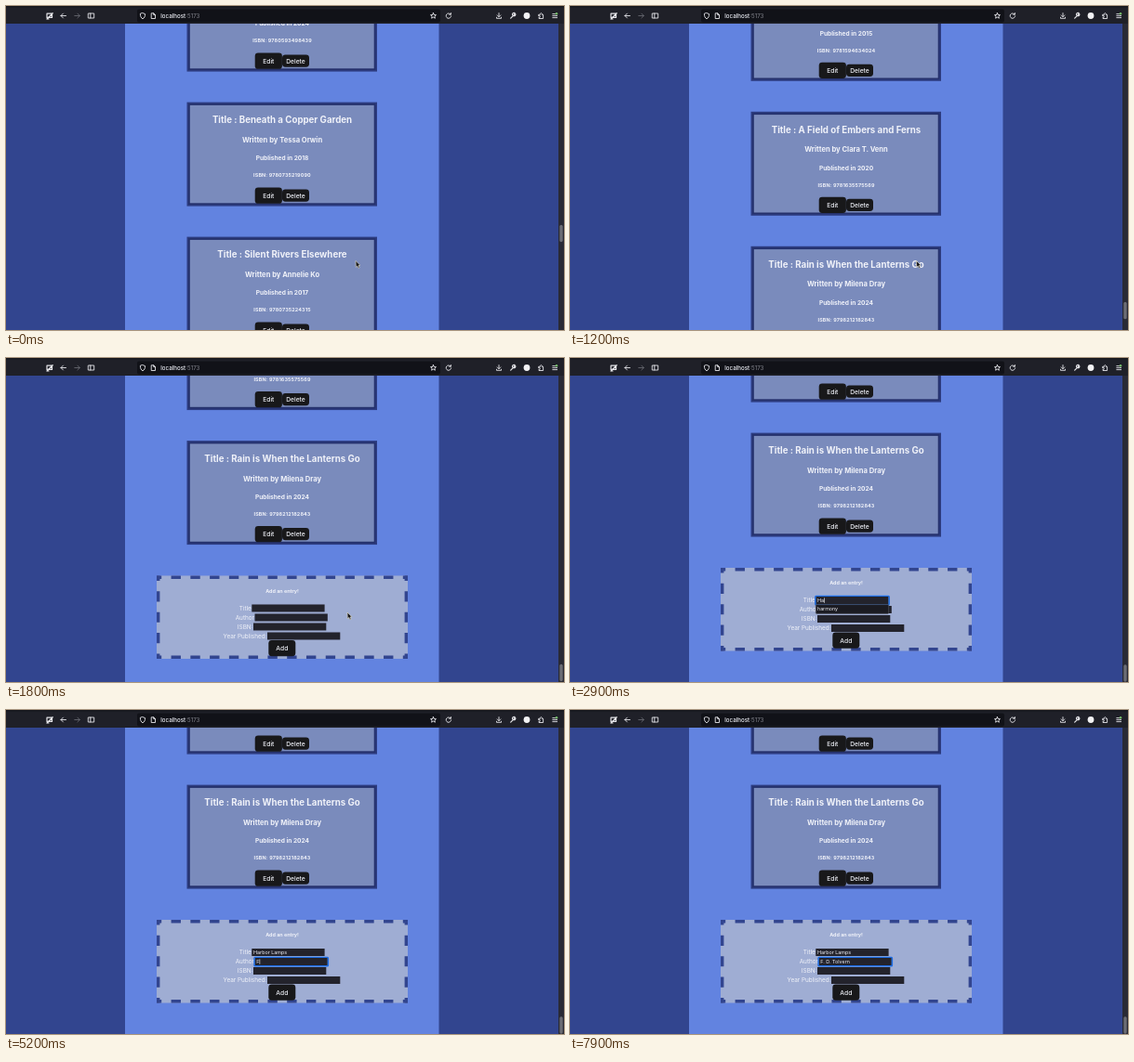
Animation, 600 px wide and 349 px high, one loop 8 s. Source, as an HTML page:

```html
<!DOCTYPE html>
<html lang="en">
<head>
<meta charset="utf-8">
<title>Book list</title>
<style>
html, body { margin: 0; width: 100%; height: 100%; overflow: hidden; background: #32458f; }
svg { display: block; width: 600px; height: 349px; font-family: Inter, "Open Sans", sans-serif; }
text { fill: #f0f2f9; white-space: pre; }
.mid { text-anchor: middle; }
.icon { fill: none; stroke: #e6e6ea; stroke-width: .9; stroke-linecap: round; stroke-linejoin: round; }
</style>
</head>
<body>
<svg id="stage" viewBox="0 0 600 349">
  <rect width="600" height="349" fill="#32458f"/>
  <rect x="128" width="337.5" height="349" fill="#6283e0"/>
  <g id="page"></g>
  <rect x="594" y="19" width="6" height="330" fill="#292a35"/>
  <rect id="thumb" x="595.3" width="3.4" height="18.5" rx="1.7" fill="#6c6d75"/>

  <rect width="600" height="19" fill="#1f2028"/>
  <rect width="600" height="1.5" fill="#15161c"/>
  <rect x="141" y="3.5" width="326" height="14" rx="2" fill="#111218"/>
  <g class="icon">
    <path d="M44 8.2h5.5v4.2h-5.5zM49.5 8.2l.8-.5M44 14l6-6M44 14h2" stroke-width="1.2"/>
    <path d="M64.5 10.5h-5.5m2.4-2.4l-2.4 2.4 2.4 2.4"/>
    <path d="M73.8 10.5h5.5m-2.4-2.4l2.4 2.4-2.4 2.4" stroke="#66676f"/>
    <path d="M88.7 8h6v5h-6zM90.8 8v5"/>
    <path d="M147 7.6l2.6 1c0 2.8-.8 4.2-2.6 5.2-1.8-1-2.6-2.4-2.6-5.2z"/>
    <path d="M156.6 7.8h2.2l1.7 1.7v4h-3.9zM158.7 7.8v1.8h1.8"/>
    <path d="M459.5 7.5l.9 2 2.1.2-1.6 1.4.5 2.1-1.9-1.1-1.9 1.1.5-2.1-1.6-1.4 2.1-.2z"/>
    <path d="M478 8.9a2.7 2.7 0 1 0 .6 2M478.4 7.5v1.7h-1.7"/>
    <path d="M530 7.6v4m-1.8-1.7l1.8 1.8 1.8-1.8M527.5 12.2v1.1h5v-1.1"/>
    <path d="M542.7 13.2l3-3m1.4-2.6a1.7 1.7 0 1 0 .8 1.3l-1.4.5z" stroke-width="1.2"/>
    <path d="M573 9.3h1.6a1 1 0 1 1 1.6 0h1.4v4.2h-4.6v-1.3a.9.9 0 1 0 0-1.6z"/>
    <path d="M587.8 8.6h4.8M587.8 10.6h4.8M587.8 12.6h4.8"/>
  </g>
  <circle cx="560" cy="10.5" r="3.4" fill="#f2f2f4"/>
  <circle cx="592" cy="8.3" r="1.3" fill="#74b96a"/>
  <text x="166.3" y="12.7" font-size="6.2" font-weight="500">localhost<tspan fill="#85868e" font-weight="400">:5173</tspan></text>

  <path id="arrow" d="M0 0l.3 6.8 1.5-1.3 1.1 2.4 1.2-.6-1.1-2.3 1.9-.2z" fill="#16161a" stroke="#e5dfc8" stroke-width=".6"/>
  <path id="beam" d="M-1.2 -3.5h2.4M0 -3.5v7M-1.2 3.5h2.4" fill="none" stroke="#dcdce2" stroke-width=".7"/>
</svg>
<script>
const LOOP = 8000, STEP = 100;
const $ = id => document.getElementById(id);
const page = $("page");

function add(parent, tag, attrs, label) {
  const el = document.createElementNS("http://www.w3.org/2000/svg", tag);
  for (const k in attrs) el.setAttribute(k, attrs[k]);
  if (label !== undefined) el.textContent = label;
  parent.appendChild(el);
  return el;
}
const rect = (g, x, y, width, height, fill, more) =>
  add(g, "rect", { x, y, width, height, fill, ...more });
const centred = (g, x, y, size, weight, label, more) =>
  add(g, "text", { x, y: y + size * .36, class: "mid", "font-size": size, "font-weight": weight, ...more }, label);

function button(g, x, y, w, h, label) {
  rect(g, x, y, w, h, "#18181a", { rx: 3.4 });
  centred(g, x + w / 2, y + h / 2, 6.7, 500, label);
}

// Book cards: title, author, year, ISBN
const books = [
  ["The Quiet Orchard", "Nadia Fenwell", 2024, "9780593498439"],
  ["Beneath a Copper Garden", "Tessa Orwin", 2018, "9780735219090"],
  ["Silent Rivers Elsewhere", "Annelie Ko", 2017, "9780735224315"],
  ["A Winter of Small Keys", "Robin Astell", 2019, "9780000412362"],
  ["The Cartwright Door", "Elsa Quimby", 2021, "9780000735218"],
  ["Paper Boats at Noon", "Hugh Palden", 2016, "9780000164417"],
  ["What the Miller Kept", "Dora Lindeck", 2022, "9780000528093"],
  ["Nine Steps to Harrow", "Owen Brastow", 2020, "9780000871650"],
  ["It Turns with Morning", "Carla Hobden", 2016, "9781524763138"],
  ["The Bell at the Ferry", "Norma Tilbeck", 2015, "9781594634024"],
  ["A Field of Embers and Ferns", "Clara T. Venn", 2020, "9781635575569"],
  ["Rain is When the Lanterns Go", "Milena Dray", 2024, "9798212182843"]
];
const PITCH = 145, LAST_TOP = 81;

books.forEach(([title, author, year, isbn], i) => {
  const top = LAST_TOP - PITCH * (books.length - 1 - i);
  const g = add(page, "g", { transform: `translate(0 ${top})` });
  rect(g, 194.5, -.4, 204.5, 112, "#2d3c80");
  rect(g, 196.1, 1.2, 201.3, 108.8, "#25316c");
  rect(g, 197.8, 2.9, 197.9, 105.4, "#7a8bbc");
  centred(g, 297, 19, 9.7, 700, "Title : " + title);
  centred(g, 297, 40.5, 7.6, 700, "Written by " + author);
  centred(g, 297, 60, 6.6, 700, "Published in " + year);
  centred(g, 297, 78.5, 5.4, 700, "ISBN: " + isbn, { "letter-spacing": .14 });
  button(g, 267.7, 91.5, 29.2, 17.3, "Edit");
  button(g, 297, 93.5, 29, 13.2, "Delete");
});

// Entry form
const form = add(page, "g", {});
rect(form, 162, 226, 270, 89.5, "#9fadd3");
// Each side begins and ends with half a dash
function dashes(x1, y1, x2, y2, count) {
  const dash = (x2 - x1 + y2 - y1) / (2 * count);
  add(form, "line", {
    x1, y1, x2, y2, stroke: "#32458f", "stroke-width": 3.4,
    "stroke-dasharray": dash, "stroke-dashoffset": dash / 2
  });
}
dashes(162, 227.7, 432, 227.7, 13);
dashes(162, 313.8, 432, 313.8, 13);
dashes(163.7, 226, 163.7, 315.5, 4);
dashes(430.3, 226, 430.3, 315.5, 4);
centred(form, 297, 242.3, 5.4, 700, "Add an entry!");

const fields = [["Title", 264.3], ["Author", 267.5], ["ISBN:", 266], ["Year Published:", 281]].map(([label, x], i) => {
  const y = 257 + 10 * i;
  add(form, "text", { x: x - .5, y: y + 6.3, "text-anchor": "end", "font-size": 6.4 }, label);
  rect(form, x, y, 78.3, 8, "#23232c");
  const ring = rect(form, x - .5, y - .6, 79.4, 9.3, "none", { stroke: "#1a6be4", "stroke-width": 1.4, rx: .8 });
  const value = add(form, "text", { x: x + 1.7, y: y + 6, "font-size": 5.4 }, "");
  const caret = rect(form, x, y + 1.4, .6, 5.4, "#ffffff");
  return { x, ring, value, caret };
});
button(form, 282.3, 295.5, 29, 17.2, "Add");

const hint = add(form, "g", {});
rect(hint, 264.3, 265.6, 78.3, 9.8, "#1b1b22", { stroke: "#55565f", "stroke-width": .6, rx: .8 });
add(hint, "text", { x: 266, y: 272.3, "font-size": 5.3 }, "harmony");

// Typing, with key times in tenths of a second
const typed = [
  { text: "Harbor Lamps", keys: [26, 28, 30, 32, 33, 35, 38, 40, 41, 43, 44, 46] },
  { text: "F. D. Tolvern", keys: [51, 54, 56, 60, 63, 66, 71, 72, 73, 75, 76, 77, 78] }
];
const FOCUS = 2300, TAB = 4800;

// Distance left to the end of the page
function scrollLeft(t) {
  if (t < 100) return 1473;
  if (t < 200) return 1075;
  if (t < 1100) return 683;
  return t < 1900 ? 296 * Math.pow(.602, (t - 1100) / 100) : 0;
}

const path = [[0, 376, 274.5], [1100, 373.3, 274.5], [1400, 370, 274.5], [1800, 367, 274], [2200, 318, 261]];
function pointer(t) {
  const n = path.findIndex(p => p[0] > t);
  if (n < 0) return path[path.length - 1].slice(1);
  const [t0, x0, y0] = path[n - 1], [t1, x1, y1] = path[n];
  const u = (t - t0) / (t1 - t0), e = u * u * (3 - 2 * u);
  return [x0 + (x1 - x0) * e, y0 + (y1 - y0) * e];
}
const show = (el, on) => el.setAttribute("visibility", on ? "visible" : "hidden");

function draw(t) {
  const left = scrollLeft(t);
  page.setAttribute("transform", `translate(0 ${left.toFixed(2)})`);
  $("thumb").setAttribute("y", 330.3 - left * .0642);

  const active = t < FOCUS ? -1 : t < TAB ? 0 : 1;
  const blink = (t + 684) % 1134 < 567;
  fields.forEach((f, i) => {
    const entry = typed[i];
    const count = entry ? entry.keys.filter(k => k * 100 <= t).length : 0;
    f.value.textContent = entry ? entry.text.slice(0, count) : "";
    show(f.ring, i === active);
    show(f.caret, i === active && blink);
    if (i === active) {
      const width = count ? f.value.getComputedTextLength() : 0;
      f.caret.setAttribute("x", f.x + 1.9 + width);
    }
    if (i === 0) show(hint, count > 0 && count < 4);
  });

  const [x, y] = pointer(t), overField = t >= 2200;
  for (const id of ["arrow", "beam"]) $(id).setAttribute("transform", `translate(${x} ${y})`);
  show($("arrow"), !overField);
  show($("beam"), overField && t < 2600);
}

const start = performance.now();
function tick() {
  const t = (performance.now() - start) % LOOP;
  draw(Math.floor(t / STEP) * STEP);
  requestAnimationFrame(tick);
}
tick();
</script>
</body>
</html>
```
